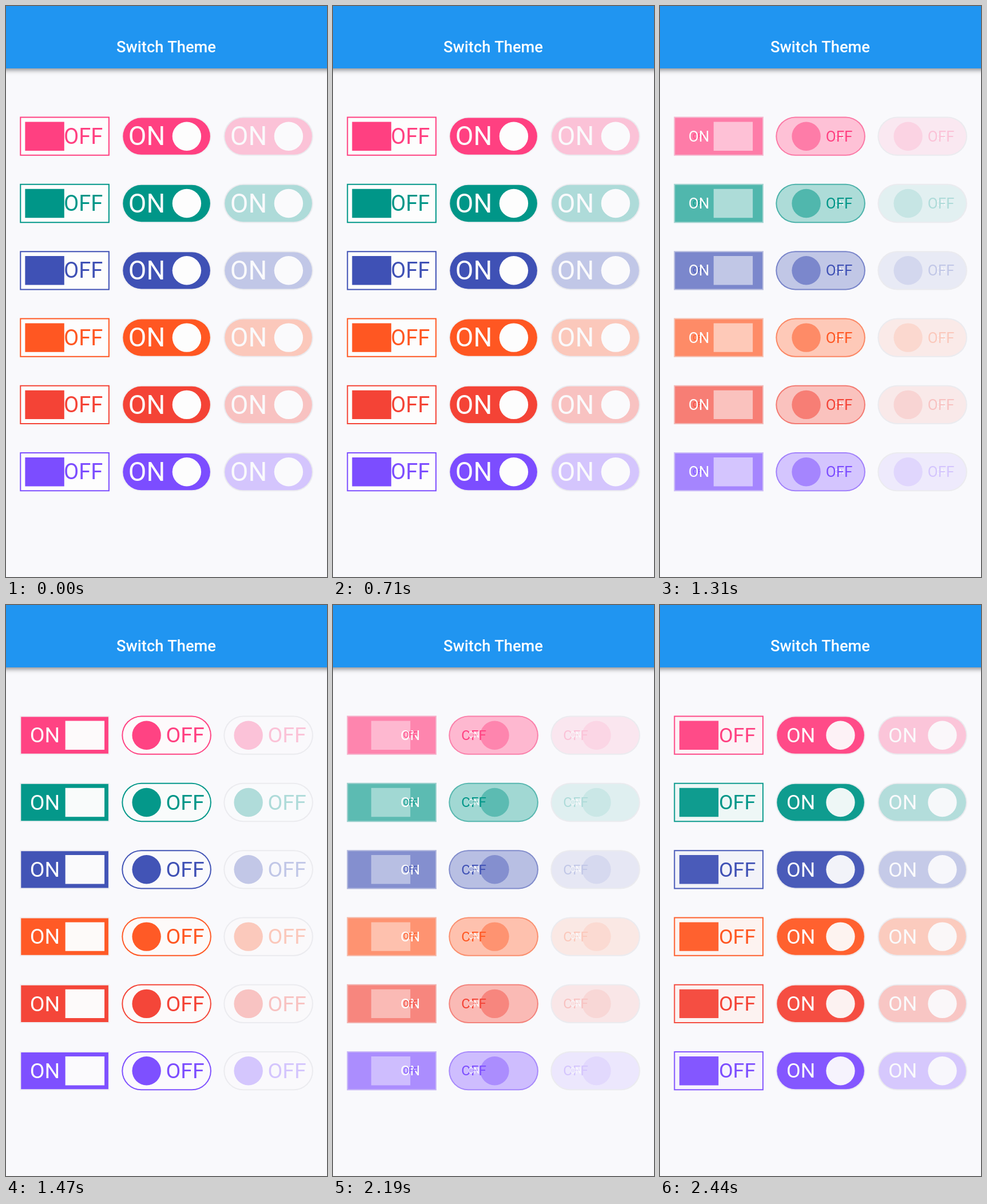
An HTML page with a canvas for the animation above (2780 ms loop, 561 by 998 pixels).

```html
<!DOCTYPE html>
<html lang="en">
<head>
<meta charset="utf-8">
<title>Switch Theme</title>
<style>
  html, body { margin: 0; width: 100%; height: 100%; overflow: hidden; background: #f9f9fc; }
  canvas { display: block; width: 561px; height: 998px; }
</style>
</head>
<body>
<canvas id="stage" width="561" height="998"></canvas>
<script>
const ctx = document.getElementById('stage').getContext('2d');
const LOOP = 2780, LAST = 2440;
const TURN = { start: 945, ms: 535 };
const BACK = { start: 2035, ms: 430 };

const hex = s => [1, 3, 5].map(i => parseInt(s.substr(i, 2), 16));
const mix = (a, b, k) => a.map((v, i) => v + (b[i] - v) * k);
const css = c => `rgb(${c.map(Math.round).join()})`;

const PAGE = hex('#f9f9fc'), WHITE = hex('#fdfdfd');
const EDGE = hex('#f1f0f3'), DIM_EDGE = hex('#ebebef');
const COLORS = ['#ff4081', '#009688', '#3f51b5', '#ff5722', '#f44336', '#7c4dff'].map(hex);

const W = 156.6, H = 68.3, LINE = 2;
const THUMB_W = 68.4, THUMB_H = 50.4, TRAVEL = 70.3;
const BOTH = 38.1, SOLO = { ON: 46, OFF: 38.1 };

// cubic-bezier(0, 0, .58, 1)
function easeOut(x) {
  let lo = 0, hi = 1;
  for (let i = 0; i < 24; i++) {
    const u = (lo + hi) / 2;
    if (1.74 * (1 - u) * u * u + u * u * u < x) lo = u; else hi = u;
  }
  return lo * lo * (3 - 2 * lo);
}

// Flipped state and linear progress of the latest toggle
function stateAt(t) {
  if (t < TURN.start) return [false, 1];
  const step = t < BACK.start ? TURN : BACK;
  return [step === TURN, Math.min(1, (t - step.start) / step.ms)];
}

function box(x, y, w, h, r, color) {
  ctx.fillStyle = color;
  ctx.beginPath();
  if (r) ctx.roundRect(x, y, w, h, r); else ctx.rect(x, y, w, h);
  ctx.fill();
}

function label(text, x, y, size, color) {
  if (size < 0.3) return;
  ctx.font = `400 ${size}px Roboto, sans-serif`;
  ctx.fillStyle = color;
  ctx.fillText(text, x, y + size * 0.3415);
}

function drawSwitch(x, cy, color, on, e, round, dim) {
  const tone = c => css(dim ? mix(PAGE, c, 0.3) : c);
  const k = on ? e : 1 - e;
  const slide = on ? easeOut(e) : 1 - easeOut(e);
  const y = cy - H / 2, r = round ? H / 2 : 0;

  box(x, y, W, H, r, css(dim ? DIM_EDGE : mix(color, EDGE, k)));
  box(x + LINE, y + LINE, W - 2 * LINE, H - 2 * LINE, r && r - LINE, tone(mix(WHITE, color, k)));

  const tw = round ? THUMB_H : THUMB_W;
  const tx = x + 43.3 + TRAVEL * slide;
  box(tx - tw / 2, cy - THUMB_H / 2, tw, THUMB_H, round ? tw / 2 : 0, tone(mix(color, WHITE, k)));

  // Both labels share the slot beside the thumb's new place
  const lx = x + (on ? 43.8 : 110.8);
  const ink = name => tone(name === 'ON' ? WHITE : color);
  const next = on ? 'ON' : 'OFF', prev = on ? 'OFF' : 'ON';
  if (e < 1) label(prev, lx, cy, BOTH * (1 - e), ink(prev));
  label(next, lx, cy, e < 1 ? BOTH * e : SOLO[next], ink(next));
}

function header() {
  ctx.save();
  ctx.shadowColor = 'rgba(0,0,0,.45)';
  ctx.shadowBlur = 8;
  ctx.shadowOffsetY = 3;
  box(-10, -10, 581, 119, 0, '#2095f1');
  ctx.restore();
  ctx.font = '500 27.3px Roboto, sans-serif';
  ctx.fillStyle = '#fff';
  ctx.fillText('Switch Theme', 280, 81);
}

function draw(t) {
  const [on, e] = stateAt(Math.min(t, LAST));
  ctx.fillStyle = css(PAGE);
  ctx.fillRect(0, 0, 561, 998);
  ctx.textAlign = 'center';
  header();
  COLORS.forEach((color, i) => {
    const cy = 227.7 + 117.3 * i;
    drawSwitch(24.3, cy, color, on, e, false, false);
    drawSwitch(202.3, cy, color, !on, e, true, false);
    drawSwitch(380.3, cy, color, !on, e, true, true);
  });
}

const begin = performance.now();
function tick() {
  draw((performance.now() - begin) % LOOP);
  requestAnimationFrame(tick);
}
tick();
</script>
</body>
</html>
```
